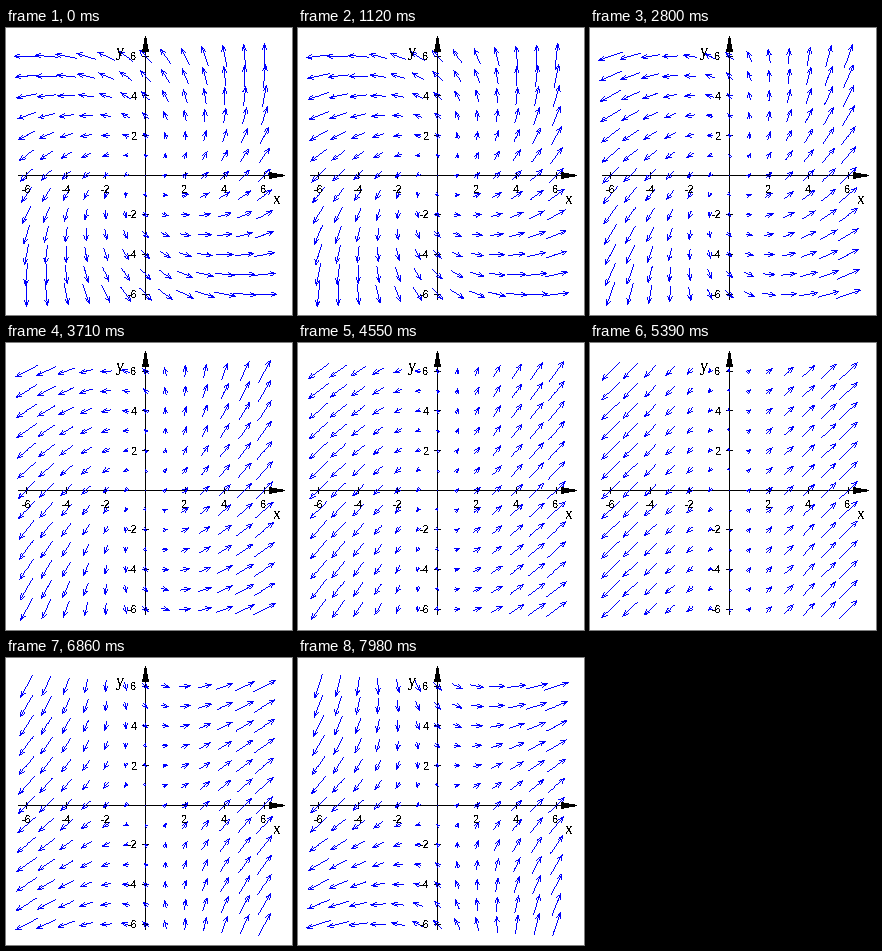
Animation, 286 px wide and 287 px high, one loop 8000 ms. Source, as a matplotlib script:

```python
import numpy as np
import matplotlib
import matplotlib.pyplot as plt
from matplotlib.animation import FuncAnimation

W, H, DPI = 286, 287, 100
LOOP, INTERVAL = 8000, 20
CX, CY = 139, 147                     # pixel of the axes' crossing
ORIGIN = np.array([139.0, 146.7])
UNIT = np.array([19.83, -19.83])
MAX_LENGTH = 24.6
HEAD, SLOPE = 5.5, 0.38
BLACK, BLUE = (0, 0, 0), (0, 0, 255)

matplotlib.rcParams["text.antialiased"] = False

fig = plt.figure(figsize=(W / DPI, H / DPI), dpi=DPI, facecolor="white")
ax = fig.add_axes([0, 0, 1, 1])


def draw_lines(canvas, starts, ends, color):
    """One-pixel lines without smoothing, stepped along their longer side."""
    starts, delta = np.asarray(starts, float), np.subtract(ends, starts)
    steps = np.maximum(np.ceil(np.abs(delta).max(axis=1)), 1)
    along = np.arange(int(steps.max()) + 1)
    t = np.minimum(along / steps[:, None], 1)
    xy = starts[:, None] + t[..., None] * delta[:, None]
    x, y = np.floor(xy + 0.5).astype(int).reshape(-1, 2).T
    canvas[y, x] = color


def label(x, y, text, size, family, ha="center"):
    ax.text(x, y, text, fontsize=size * 72 / DPI, family=family, ha=ha,
            va="center_baseline", color="black", zorder=3)


def arrow_tip(xs, ys):
    ax.fill(xs, ys, color="black", lw=0, antialiased=False, zorder=3)


def draw_axes(canvas):
    segments = [((12, CY), (270, CY)), ((CX, 16), (CX, 271))]
    for v in (-6, -4, -2, 2, 4, 6):
        x, y = np.round(ORIGIN + UNIT * v)
        segments += [((x, CY - 3), (x, CY + 3)), ((CX - 3, y), (CX + 3, y))]
        label(x, 161, str(v), 11, "Liberation Sans")
        label(131, y + 0.5, str(v), 11, "Liberation Sans", "right")
    draw_lines(canvas, *zip(*segments), BLACK)
    mx, my = CX + 0.5, CY + 0.5
    arrow_tip([279, 263, 263], [my, my - 3, my + 3])
    arrow_tip([mx, mx - 3, mx + 3], [8, 24, 24])
    label(270.5, 170.5, "x", 16, "Liberation Serif")
    label(113.5, 22, "y", 16, "Liberation Serif")


background = np.full((H, W, 3), 255, np.uint8)
draw_axes(background)
picture = ax.imshow(background, extent=(0, W, H, 0), interpolation="nearest")
ax.set(xlim=(0, W), ylim=(H, 0), aspect="auto")
ax.axis("off")

gx, gy = (g.ravel() for g in np.meshgrid(np.arange(-6, 7), np.arange(-6, 7)))
points = ORIGIN + UNIT * np.column_stack([gx, gy])


def draw_field(canvas, k):
    """Arrows of x' = x - k*y, y' = x + k*y, scaled to the longest vector."""
    v = np.column_stack([gx - k * gy, -(gx + k * gy)]).astype(float)
    v *= MAX_LENGTH / np.hypot(*v.T).max()
    length = np.hypot(*v.T)[:, None]
    along = v / np.maximum(length, 1e-9)
    across = along[:, ::-1] * [-1, 1]
    head = np.minimum(HEAD, 2 + 0.5 * length)
    tail, tip = points - v / 2, points + v / 2
    base, side = tip - along * head, across * head * SLOPE
    for start in (tail, base + side, base - side):
        draw_lines(canvas, start, tip, BLUE)


def update(i):
    t = (i * INTERVAL + INTERVAL / 2) // 70 * 70
    step = int(t / 214.3)
    canvas = background.copy()
    draw_field(canvas, 1 - 2 * step / 49)
    picture.set_data(canvas)
    return picture,


anim = FuncAnimation(fig, update, frames=LOOP // INTERVAL, interval=INTERVAL,
                     repeat=True, repeat_delay=0, blit=False)
plt.show()
```
